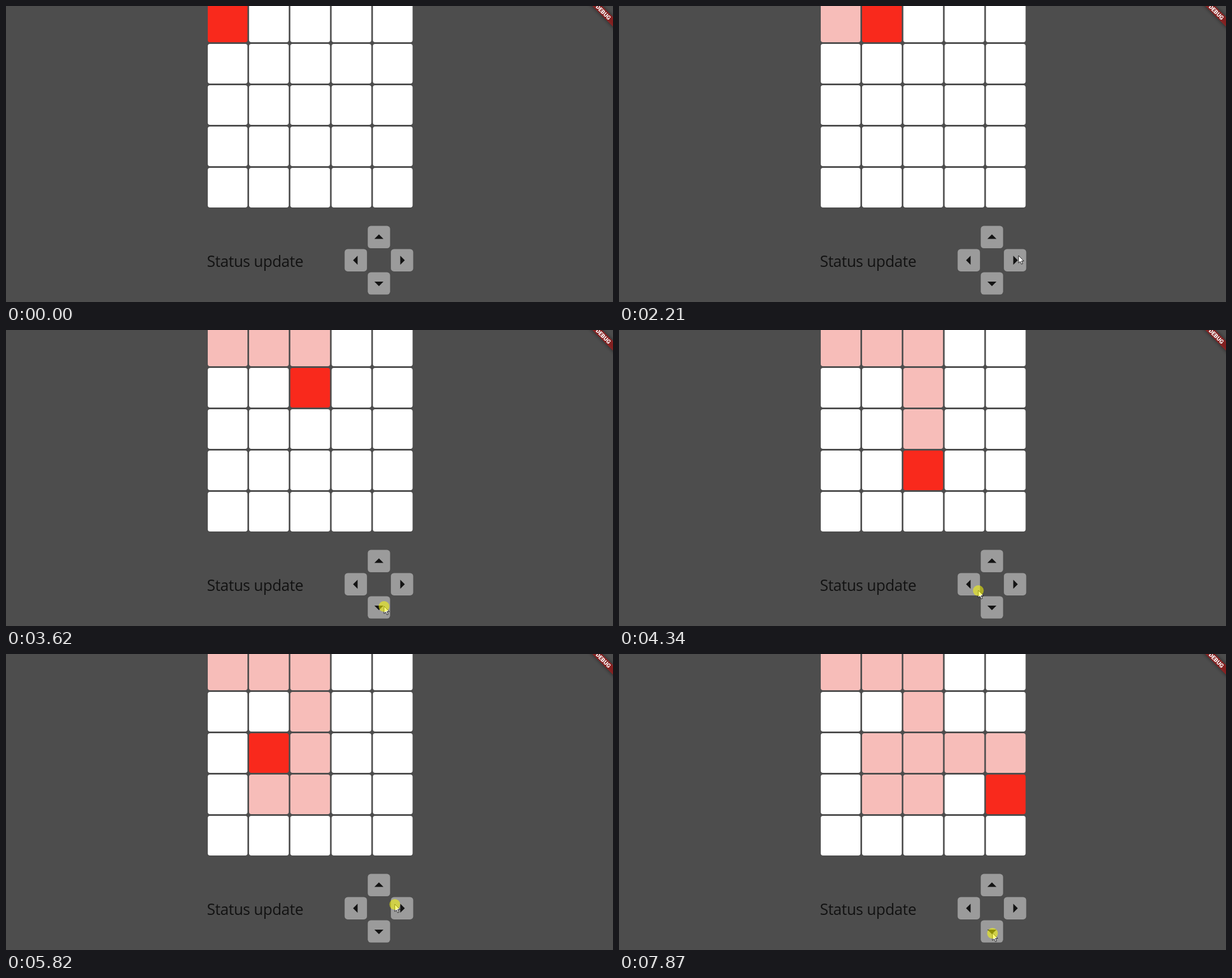
Write an HTML page that moves like this. It is 1071 by 523 pixels and loops after 8000 ms.

```html
<!DOCTYPE html>
<html lang="en">
<head>
<meta charset="utf-8">
<title>Grid walker</title>
<style>
html, body { margin: 0; width: 100%; height: 100%; overflow: hidden; background: #4d4d4d; }
svg { display: block; width: 1071px; height: 523px; }
.key rect { fill: #9b9b9b; }
.key path { fill: #141414; }
.status { font: 27px "Open Sans", "Noto Sans", sans-serif; letter-spacing: -.37px; fill: #121212; }
.banner { font: 900 10.2px Roboto, Inter, sans-serif; fill: #fff; text-anchor: middle; }
</style>
</head>
<body>
<svg viewBox="0 0 1071 523">
  <defs><filter id="soft" x="-30%" y="-150%" width="160%" height="400%"><feGaussianBlur stdDeviation="3"/></filter></defs>
  <rect width="1071" height="523" fill="#4d4d4d"/>
  <g id="board"></g>
  <text class="status" x="354.5" y="461">Status update</text>
  <g id="keys"></g>
  <g transform="translate(1078 -13) rotate(45)">
    <rect x="-40" y="28" width="80" height="12" fill="#000" opacity=".5" filter="url(#soft)"/>
    <rect x="-40" y="28" width="80" height="12" fill="#b71c1c" fill-opacity=".63"/>
    <text class="banner" x="0" y="37.6">DEBUG</text>
  </g>
  <g id="pointer">
    <path d="M0 0V13.2L3 10.4 5 15.2 7.2 14.3 5.2 9.6H9.3Z" fill="#fff" stroke="#111" stroke-width=".9"/>
    <circle id="halo" cx="0" cy=".5" r="9.5" fill="#ff0" fill-opacity=".53"/>
  </g>
</svg>
<script>
const LOOP = 8000, SIZE = 5;
const WHITE = '#fff', PINK = '#f7bdb9', RED = '#f9291c';
const DIRS = { up: [0, -1], right: [1, 0], down: [0, 1], left: [-1, 0] };

// Pointer glides: first step, last step, step count, destination
const GLIDES = [
  [130, 130, 1, 798, 315],
  [240, 570, 4, 655, 487],
  [680, 790, 2, 611, 450],
  [900, 1140, 3, 712, 451],
  [1220, 1680, 7, 705, 441],
  [2740, 3000, 3, 666, 487],
  [3070, 3070, 1, 667, 488],
  [4000, 4110, 2, 636, 461],
  [4190, 4190, 1, 634, 460],
  [4700, 4950, 3, 670, 405],
  [5560, 5820, 3, 686, 442],
  [6710, 6710, 1, 696, 447],
  [7220, 7580, 5, 659, 493]
];

// Button presses: down, up, direction moved on release
const CLICKS = [
  [1980, 2210, 'right'], [2460, 2600, 'right'],
  [3300, 3450, 'down'], [3560, 3670, 'down'], [3780, 3890, 'down'],
  [4340, 4570, 'left'], [5200, 5430, 'up'],
  [5820, 6130, 'right'], [6260, 6390, 'right'], [6500, 6600, 'right'], [6830, 7070, 'right'],
  [7670, 7770, 'down'], [7870, 8000, 'down']
];

const byId = id => document.getElementById(id);

function add(parent, tag, attrs) {
  const el = document.createElementNS('http://www.w3.org/2000/svg', tag);
  for (const name in attrs) el.setAttribute(name, attrs[name]);
  return parent.appendChild(el);
}

const cells = Array.from({ length: SIZE * SIZE }, (_, i) => add(byId('board'), 'rect', {
  x: 356 + (i % SIZE) * 72.85, y: -6 + Math.floor(i / SIZE) * 73, width: 70, height: 70, rx: 4
}));

Object.values(DIRS).forEach(([dx, dy], i) => {
  const key = add(byId('keys'), 'g', {
    class: 'key', transform: `translate(${658 + dx * 40.8} ${449.2 + dy * 40.9})`
  });
  add(key, 'rect', { x: -19.7, y: -19.7, width: 39.4, height: 39.4, rx: 5.5 });
  add(key, 'path', { d: 'M-8 3.2L0 -4.8 8 3.2Z', transform: `rotate(${i * 90})` });
});

function pointerAt(t) {
  let pos = null;
  for (const [start, end, steps, x, y] of GLIDES) {
    if (t < start) break;
    const gap = (end - start) / (steps - 1);
    const done = t >= end ? 1 : (Math.floor((t - start) / gap) + 1) / steps;
    pos = pos ? [pos[0] + (x - pos[0]) * done, pos[1] + (y - pos[1]) * done] : [x, y];
  }
  return pos;
}

function paintBoard(t) {
  const clamp = v => Math.max(0, Math.min(SIZE - 1, v));
  const trail = new Set([0]);
  let col = 0, row = 0;
  for (const [, up, dir] of CLICKS) {
    if (t < up) break;
    col = clamp(col + DIRS[dir][0]);
    row = clamp(row + DIRS[dir][1]);
    trail.add(row * SIZE + col);
  }
  const head = row * SIZE + col;
  cells.forEach((cell, i) =>
    cell.setAttribute('fill', i === head ? RED : trail.has(i) ? PINK : WHITE));
}

function render(t) {
  paintBoard(t);
  const pos = pointerAt(t);
  const pressed = CLICKS.some(([down, up]) => t >= down && t < up);
  byId('pointer').setAttribute('visibility', pos ? 'visible' : 'hidden');
  if (pos) byId('pointer').setAttribute('transform', `translate(${pos[0]} ${pos[1]})`);
  byId('halo').setAttribute('display', pressed ? 'inline' : 'none');
}

const begin = performance.now();
function tick() {
  render((performance.now() - begin) % LOOP);
  requestAnimationFrame(tick);
}
tick();
</script>
</body>
</html>
```
